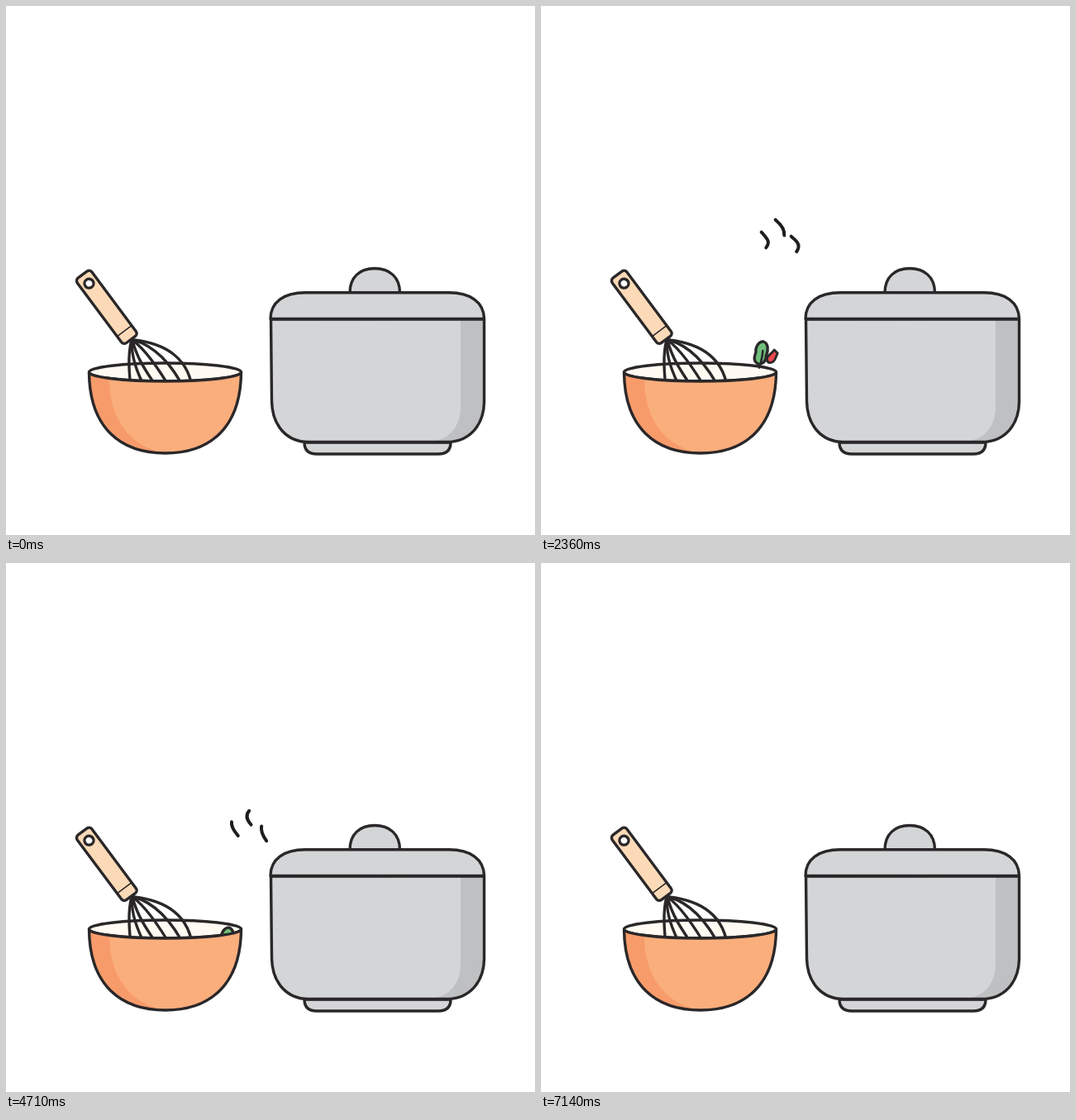
An HTML page for the animation above (7.21 s loop, 640 by 640 pixels).

```html
<!DOCTYPE html>
<html lang="en">
<head>
<meta charset="utf-8">
<title>Cooking</title>
<style>
  html, body { margin: 0; width: 100%; height: 100%; overflow: hidden; background: #fff; }
  svg { display: block; width: 100%; height: 100%; }
  .ink { stroke: #2a2729; stroke-width: 3.4; stroke-linecap: round; stroke-linejoin: round; }
  .line { fill: none; }
  .metal { fill: #d4d5d7; }
  #steam path { fill: none; stroke: #1f1d1f; stroke-width: 4; stroke-linecap: round; stroke-linejoin: round; }
</style>
</head>
<body>
<svg viewBox="0 0 640 640">
  <defs>
    <clipPath id="aboveRim"><path d="M0 0H640V443H284.500A92 11 0 0 1 100.500 443H0Z"/></clipPath>
    <path id="bowl" d="M100.500 443C101 511 139 541 193 541C246 541 284 511 284.500 443A92 11 0 0 1 100.500 443Z"/>
    <path id="pot" d="M320.500 379L321.500 478C322 508 340 527.500 366 527.500H533C560 527.500 578 508 578.500 479V379Z"/>
    <path id="wedge" d="M-9 -18C8 -22 22 -8 23 10C20 16 5 20 -3 18Z"/>
  </defs>

  <g id="steam">
    <path pathLength="1" d="M290 359Q287 337 280 329Q270 317 274 310C276 304 266 300 269 296C278 287 276 284 268 275L264 271"/>
    <path pathLength="1" d="M301 347Q302 324 296 316Q287 306 296 298C299 295 290 288 293 282C297 274 291 265 285 260L281 256"/>
    <path pathLength="1" d="M324 366Q321 345 315 336Q307 325 309.500 317C312 310 302 306 305 302C314 293 314 288 304 280L300 276"/>
  </g>

  <!-- pot -->
  <path class="ink metal" d="M361 528C361 538 367 542 376 542H523C532 542 538 538 538 528Z"/>
  <use href="#pot" class="metal"/>
  <path fill="#bfc0c2" d="M550 379V484C550 510 536 525 512 527.500H533C560 527.500 578 508 578.500 479V379Z"/>
  <use href="#pot" class="ink line"/>
  <g id="lid" class="ink metal">
    <path d="M416 347C416 328 428 317.500 446 317.500C464 317.500 476.500 328 476.500 347Z"/>
    <path d="M320 378.500C320 358 336 347 362 346.800H536C562 347 578 358 578.500 378.300Z"/>
  </g>

  <!-- bowl, its contents, then its front wall -->
  <ellipse class="ink" cx="192.500" cy="443" rx="92" ry="11" fill="#fffaf2"/>
  <g id="whisk" class="ink">
    <g class="line">
      <path d="M152 404C147 422 149 445 152 470"/>
      <path d="M152 404C152 425 157 440 171 468"/>
      <path d="M153 404C158 425 168 440 187 468"/>
      <path d="M153 404C168 415 183 435 202 468"/>
      <path d="M154 404C178 410 201 432 218 468"/>
      <path d="M155 404C191 408 224 425 226 470"/>
    </g>
    <g transform="translate(92.500 325) rotate(-36.700)">
      <rect x="-11" width="22" height="98" rx="4.500" fill="#fddab7"/>
      <path d="M-10 85H10" stroke-width="1.600"/>
      <circle cy="13.300" r="5.500" fill="#fff"/>
    </g>
  </g>
  <g class="ink" clip-path="url(#aboveRim)">
    <use id="lemon" href="#wedge" fill="#ffc93f"/>
    <g id="leaf">
      <path fill="#6fc07a" d="M0 14C-9 13 -8 6 -7 0C-9 -8 -4 -14 0 -14C6 -13 8 -5 6 2C7 8 4 12 0 14Z"/>
      <path class="line" d="M1 -3Q2 6 0 18" stroke-width="2.600"/>
    </g>
    <path id="sprig" fill="#6fc07a" d="M0 14C-9 13 -8 -14 0 -14C9 -11 8 10 0 14Z"/>
    <g id="slice">
      <use href="#wedge" fill="#ffc93f"/>
      <path d="M3 -7L9 -1"/>
    </g>
    <path id="pepper" fill="#e9484d" stroke-width="2.800" d="M-6 3C-6 9 1 9 4 3L7 -4L3 -8C0 -3 -5 -3 -6 3Z"/>
  </g>
  <use href="#bowl" fill="#faae7c"/>
  <path fill="#f89b6b" d="M100.500 443C101 511 139 541 193 541C155 535 125 505 125 450.500C110 449 100.500 446 100.500 443Z"/>
  <use href="#bowl" class="ink line"/>
</svg>
<script>
const LOOP = 7210, STIR = LOOP / 6;
const FIRST_TOSS = 1101, TOSSES = 5, SURFACE = 470;
const STEAM_EVERY = 3315;
const el = id => document.getElementById(id);
const clamp = u => Math.max(0, Math.min(1, u));
const easeOut = (u, power) => 1 - (1 - clamp(u)) ** power;

function drawSteam(t) {
  const time = t % STEAM_EVERY;
  const head = easeOut((time - 964) / 2100, 3);
  const tail = easeOut((time - 797) / 2426, 1.3);
  const length = t < STEAM_EVERY * 2 ? head - tail : 0;
  for (const path of el("steam").children) {
    path.style.display = length > 0.005 ? "" : "none";
    path.setAttribute("stroke-dasharray", `${Math.max(length, 0)} 3`);
    path.setAttribute("stroke-dashoffset", -tail);
  }
}

function drawStir(t) {
  const time = t % STIR;
  const swing = time < 290
    ? easeOut(time / 290, 2)
    : (1 + Math.cos(Math.PI * clamp((time - 290) / 770))) / 2;
  el("whisk").setAttribute("transform", `rotate(${8.3 * swing} 111.4 351.3)`);
  el("lid").setAttribute("transform", `rotate(${-0.6 * swing ** 1.5} 449 379)`);
}

// A piece leaps fast, falls slowly, drifts left and turns ever faster; u runs from 0 to 1.
function hop(id, u, { x, drift, rise, tilt = 0, spin = 0 }) {
  const piece = el(id);
  const visible = u > 0 && u < 1;
  piece.style.display = visible ? "" : "none";
  if (!visible) return;
  const y = SURFACE - rise * Math.sin(Math.PI * u ** 0.55);
  piece.setAttribute("transform",
    `translate(${x - drift * u ** 2} ${y}) rotate(${tilt - spin * u ** 3})`);
}

function drawToss(t) {
  const since = t - FIRST_TOSS;
  const time = since < TOSSES * STIR ? since % STIR : -1;
  const late = (time - 705) / 300;
  hop("leaf", time / 520, { x: 267.5, drift: 52, rise: 62, tilt: 10, spin: 540 });
  hop("pepper", time / 700, { x: 280, drift: 100, rise: 64, spin: 1300 });
  hop("lemon", (time - 205) / 300, { x: 253, drift: 12, rise: 22 });
  hop("slice", late, { x: 228, drift: 8, rise: 26, tilt: 25 });
  hop("sprig", late, { x: 249, drift: 8, rise: 20, tilt: -75 });
}

const start = performance.now();
function frame() {
  const t = (performance.now() - start) % LOOP;
  drawSteam(t);
  drawStir(t);
  drawToss(t);
  requestAnimationFrame(frame);
}
frame();
</script>
</body>
</html>
```
